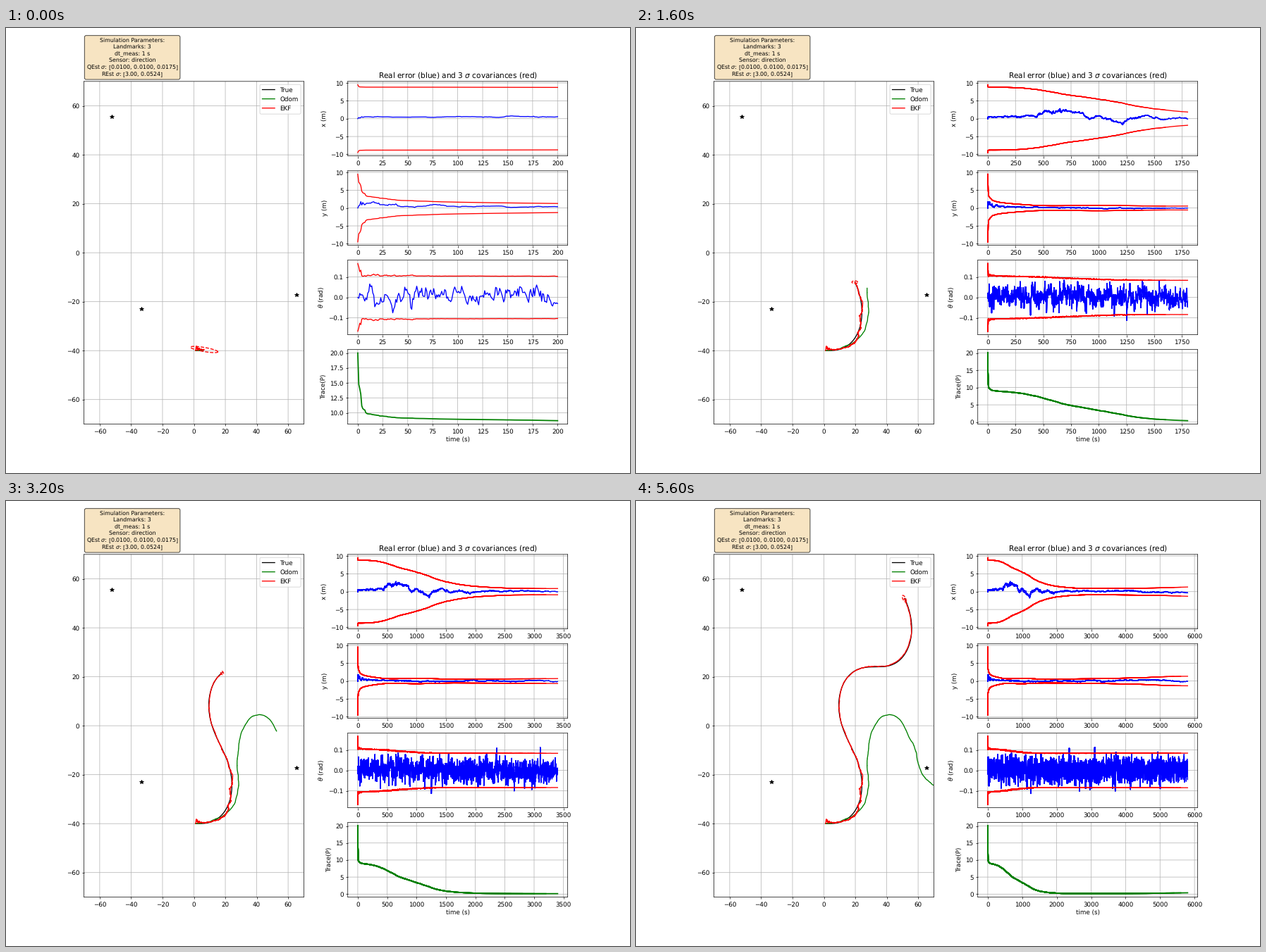
A matplotlib script that plays this animation: 885 px wide and 632 px high, repeating every 5800 ms.

```python
import numpy as np
import matplotlib.pyplot as plt
from matplotlib.animation import FuncAnimation
from matplotlib.patches import FancyBboxPatch

SEED = 123456
STEPS = 6000       # planned length of the run (s)
FRAMES, STRIDE = 29, 200
LAST = FRAMES * STRIDE

Q_SIGMA = np.array([0.01, 0.01, np.radians(1)])
R_SIGMA = np.array([3.0, np.radians(3)])

# soft sub-pixel rendering
plt.rcParams.update({"path.snap": False, "text.hinting": "none"})


def wrap(a):
    return (a + np.pi) % (2 * np.pi) - np.pi


def compose(pose, move):
    c, s = np.cos(pose[2]), np.sin(pose[2])
    return np.array([pose[0] + c * move[0] - s * move[1],
                     pose[1] + s * move[0] + c * move[1],
                     wrap(pose[2] + move[2])])


def bearing(pose, mark):
    return np.arctan2(mark[1] - pose[1], mark[0] - pose[0]) - pose[2]


def simulate(marks):
    """Run the robot and a bearing-only EKF, returning all histories."""
    rng = np.random.RandomState()
    true = odom = est = np.array([1, -40, -np.pi / 2])
    cov = 10 * np.diag([1, 1, np.radians(1) ** 2])
    q = np.diag(Q_SIGMA ** 2)
    log = [(true, odom, est, cov)]
    for k in range(1, LAST + 1):
        u = np.array([0, 0.025, np.radians(0.1) * np.sin(3 * np.pi * k / STEPS)])
        true = compose(true, u)

        rng.seed(SEED * 2 + k)
        noise = Q_SIGMA * rng.randn(3)
        odom = compose(compose(odom, u), noise)

        # prediction
        pred = compose(est, u + noise)
        f = np.eye(3)
        f[0, 2], f[1, 2] = est[1] - pred[1], pred[0] - est[0]
        cov = f @ cov @ f.T + q

        # correction with one random landmark
        rng.seed(SEED * 3 + k)
        mark = marks[:, rng.randint(0, marks.shape[1])]
        z = bearing(true, mark) + (R_SIGMA * rng.randn(2))[1]
        dx, dy = mark - pred[:2]
        r2 = dx * dx + dy * dy
        h = np.array([dy / r2, -dx / r2, -1])
        gain = cov @ h / (h @ cov @ h + R_SIGMA[1] ** 2)
        est = pred + gain * wrap(z - bearing(pred, mark))
        est[2] = wrap(est[2])
        cov = cov - np.outer(gain, h @ cov)
        cov = (cov + cov.T) / 2
        log.append((true, odom, est, cov))
    return [np.array(h) for h in zip(*log)]


marks = 140 * (np.random.RandomState(SEED).rand(2, 3) - 0.5)
true, odom, est, cov = simulate(marks)
t = np.arange(LAST + 1)
err = est - true
err[:, 2] = wrap(err[:, 2])
sd = 3 * np.sqrt(np.diagonal(cov, axis1=1, axis2=2))
trace = np.trace(cov, axis1=1, axis2=2)


def ellipse(k):
    """Outline of the 3-sigma position ellipse at step k."""
    val, vec = np.linalg.eig(cov[k, :2, :2])
    big = np.argmax(val)
    c, s = vec[:, big]
    a = np.arange(0, 2 * np.pi + 0.1, 0.1)
    x = 3 * np.sqrt(val[big]) * np.cos(a)
    y = 3 * np.sqrt(val[1 - big]) * np.sin(a)
    return est[k, 0] + c * x - s * y, est[k, 1] + s * x + c * y


fig = plt.figure(figsize=(14.0032, 10), dpi=63.2)

# map
world = fig.add_subplot(1, 2, 1)
world.plot(*marks, "*k")
paths = [(world.plot([], [], color, label=name)[0], data)
         for data, color, name in ((true, "k", "True"), (odom, "g", "Odom"),
                                   (est, "r", "EKF"))]
ring, = world.plot([], [], "--r")
world.axis([-70, 70, -70, 70])
world.grid(True)
world.legend(loc="upper right")

# parameter box, laid out in stage pixels
stage = fig.add_axes([0, 0, 1, 1])
stage.axis([0, 885, 632, 0])
stage.axis("off")
stage.add_patch(FancyBboxPatch(
    (111.3, 10.7), 135.6, 62.4, boxstyle="round,pad=0,rounding_size=2.4",
    facecolor="wheat", edgecolor="k", alpha=0.8))
info = ["Simulation Parameters:", "Landmarks: 3", "dt_meas: 1 s",
        "Sensor: direction", r"QEst $\sigma$: [0.0100, 0.0100, 0.0175]",
        r"REst $\sigma$: [3.00, 0.0524]"]
for i, line in enumerate(info):
    stage.text(179.3, 19.5 + 9.5 * i + max(0, i - 3), line,
               fontsize=9, ha="center", va="baseline")

# error panels: each update draws a longer run over the earlier ones
runs = []
panels = []


def add_panel(row, label, series, width=1.5):
    ax = fig.add_subplot(4, 2, 2 * row)
    ax.grid(True)
    ax.set_ylabel(label)
    for run in range(FRAMES):
        stop = STRIDE * (run + 1) + 1
        for data, color in series:
            line, = ax.plot(t[:stop], data[:stop], color, lw=width)
            runs.append((line, run))
    panels.append(ax)
    return ax


for i, label in enumerate(["x (m)", "y (m)", r"$\theta$ (rad)"]):
    ax = add_panel(i + 1, label,
                   [(err[:, i], "b"), (sd[:, i], "r"), (-sd[:, i], "r")])
    ax.set_ylim(-1.1 * sd[0, i], 1.1 * sd[0, i])
panels[0].set_title(r"Real error (blue) and 3 $\sigma$ covariances (red)")
trace_ax = add_panel(4, "Trace(P)", [(trace, "g")], width=2)
trace_ax.set_xlabel("time (s)")


def update(i):
    now = STRIDE * (i + 1)
    for line, data in paths:
        line.set_data(data[:now + 1, 0], data[:now + 1, 1])
    ring.set_data(*ellipse(now))
    for line, run in runs:
        line.set_visible(run <= i)
    for ax in panels:
        ax.set_xlim(-0.05 * now, 1.05 * now)
    low, high = trace[:now + 1].min(), trace[:now + 1].max()
    pad = 0.05 * (high - low)
    trace_ax.set_ylim(low - pad, high + pad)
    return []


anim = FuncAnimation(fig, update, frames=FRAMES, interval=200, repeat=True,
                     repeat_delay=0, blit=False)
plt.show()
```
